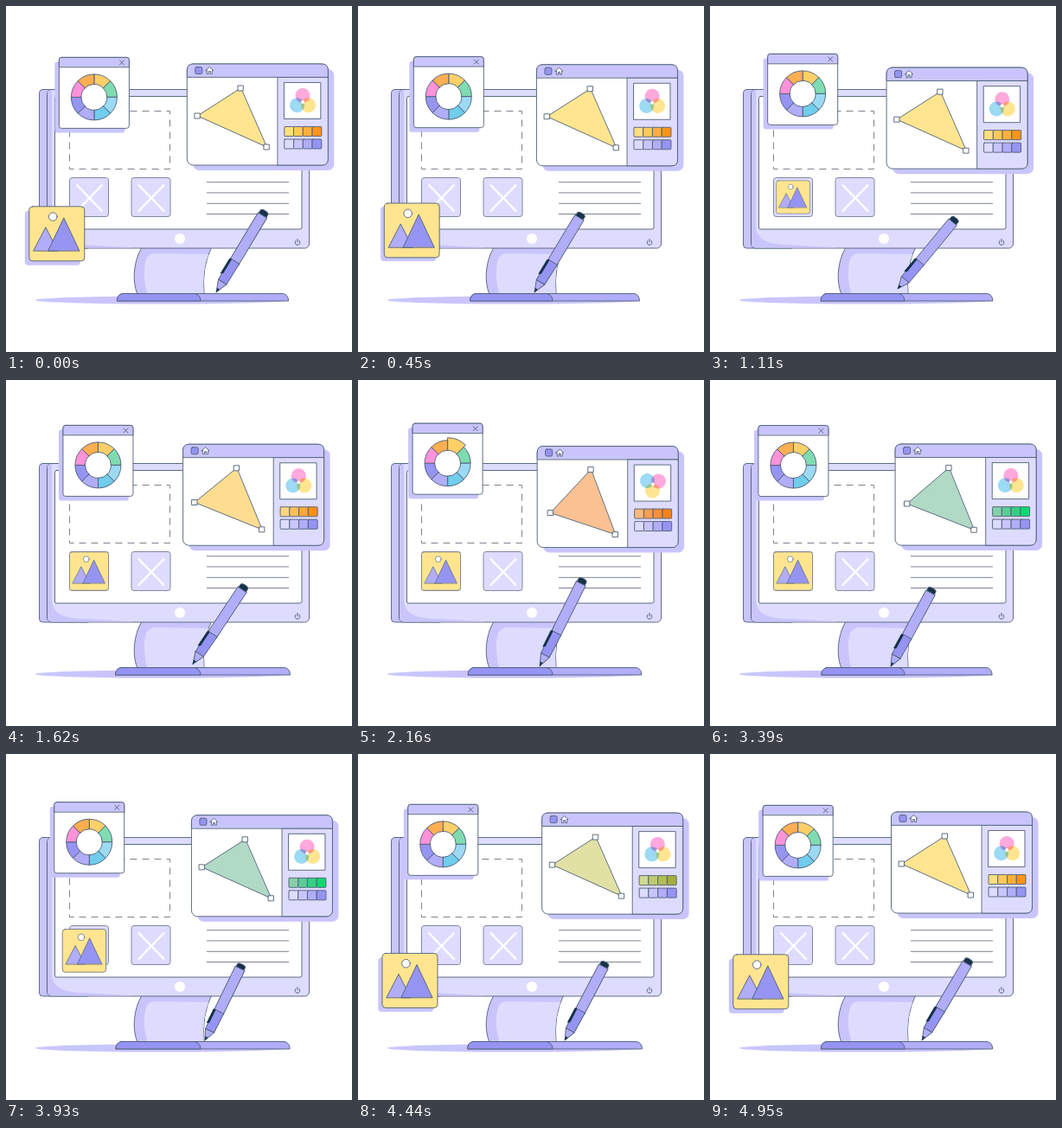
These frames come from a looping animation (400x400 px, 4.98 s). An HTML page:

```html
<!DOCTYPE html>
<html lang="en">
<head>
<meta charset="utf-8">
<title>Design desk</title>
<style>
html, body { margin: 0; width: 100%; height: 100%; overflow: hidden; background: #fff; }
svg { display: block; width: 100vw; height: 100vh; }
.o { stroke: #4e5f78; stroke-width: .9; stroke-linejoin: round; stroke-linecap: round; }
.n { fill: none; }
.light { fill: #dedcfe; }
.mid { fill: #c9c5fc; }
.lav { fill: #b1adf8; }
.deep { fill: #9694f3; }
.white { fill: #fff; }
.dark { fill: #16324a; }
.gray { fill: none; stroke: #7d8590; stroke-width: 1; }
#venn .ink { mix-blend-mode: multiply; }
</style>
</head>
<body>
<svg viewBox="0 0 400 400">
  <defs>
    <g id="slot">
      <rect class="light" stroke="#8187a0" width="45" height="45" rx="3"/>
      <path d="M8 8 38 39M38 8 8 39" fill="none" stroke="#fff" stroke-width="2.4"/>
    </g>
  </defs>

  <!-- stand -->
  <ellipse class="mid" cx="180" cy="340" rx="146" ry="4.6"/>
  <path class="mid o" d="M158 278C149 290 144.500 316 152 333H229Q226 302 238 278Z"/>
  <path class="light" d="M163 332Q157 308 162 293Q164 286 174 286L234 287Q227 304 228.500 332Z"/>
  <g id="base">
    <path class="lav o" d="M-93.500 332.500H93.500Q99.500 334 99.500 341H-99.500Q-99.500 334 -93.500 332.500Z"/>
    <path class="deep o" d="M-93.500 332.500H-9.500Q-2.500 334 -2.500 341H-99.500Q-99.500 334 -93.500 332.500Z"/>
  </g>

  <!-- monitor -->
  <rect class="mid o" x="38.500" y="96.500" width="60" height="183.500" rx="4"/>
  <rect class="light o" x="47.500" y="96.500" width="303" height="183.500" rx="5"/>
  <path class="mid" d="M48 101Q48 97 53 97V256Q54 275 88 276L150 279.500H53Q48 279 48 275Z"/>
  <rect class="white o" x="56.500" y="104.500" width="285.500" height="153.500" rx="2"/>
  <circle class="white" cx="201" cy="269" r="6"/>
  <path class="o n" d="M335.300 271a2.900 2.900 0 1 0 3.400 0M337 269.500V273"/>

  <!-- page -->
  <rect class="gray" x="73.500" y="121.500" width="116" height="67" stroke-dasharray="8 6"/>
  <use href="#slot" x="73.500" y="198.500"/>
  <use href="#slot" x="145" y="198.500"/>
  <path class="gray" d="M232 203.700H327M232 215.900H327M232 228.300H327M232 240.500H327"/>

  <!-- colour wheel window -->
  <g id="wheelWin">
    <rect class="mid" x="-5" y="5" width="81" height="82" rx="3"/>
    <rect class="white o" width="81" height="82" rx="3"/>
    <path class="mid o" d="M0 11V3Q0 0 3 0H78Q81 0 81 3V11Z"/>
    <path class="o n" d="M70 3.500 75 8.500M75 3.500 70 8.500"/>
    <g id="wheel" transform="translate(40.500 46)"></g>
  </g>

  <!-- drawing window -->
  <g id="drawWin">
    <rect class="mid" x="7" y="6" width="163" height="117" rx="7"/>
    <rect class="white o" width="163" height="117" rx="7"/>
    <path class="light o" d="M105 15H163V110Q163 117 156 117H105Z"/>
    <path class="mid o" d="M0 15V7Q0 0 7 0H156Q163 0 163 7V15Z"/>
    <rect class="deep o" x="9.500" y="3.500" width="8" height="8" rx="1.500"/>
    <path class="white o" d="M21.500 7.500 26 3.500 30.500 7.500H29V11.500H27V8.500H25V11.500H23V7.500Z"/>
    <rect class="white o" x="112.500" y="21.500" width="42" height="42"/>
    <g id="venn" style="isolation:isolate">
      <circle class="ink" cy="-7.500" r="8.500" fill="#ffa9dd"/>
      <circle class="ink" cx="-6.500" cy="3.750" r="8.500" fill="#9cdaf5"/>
      <circle class="ink" cx="6.500" cy="3.750" r="8.500" fill="#ffe58f"/>
      <circle class="white" r="2"/>
    </g>
    <g id="swatches"></g>
    <path id="tri" class="o"/>
    <g id="handles"></g>
  </g>

  <!-- picture tile -->
  <g id="tile">
    <rect id="tileShade" class="mid" width="64" height="63" rx="4"/>
    <rect class="o" fill="#ffe58f" width="64" height="63" rx="4"/>
    <circle class="white o" cx="27.500" cy="11.800" r="4.800"/>
    <path class="lav o" d="M5 51 19 24 33 51Z"/>
    <path class="deep o" d="M22 51 40 13 58 51Z"/>
  </g>

  <!-- pen, tip at the origin, pointing down -->
  <g id="pen">
    <path class="lav o" d="M-6 -40V-104H6V-40Z"/>
    <path class="dark o" d="M-5 -104V-108Q-4.500 -110 0 -110Q4.500 -110 5 -108V-104Z"/>
    <path class="deep o" d="M-5.500 -14 -6 -42H6L5.500 -14Z"/>
    <path class="lav o" d="M-5.500 -14 0 0 5.500 -14Z"/>
    <path class="dark" d="M-1.600 -5 0 0.500 1.600 -5Z"/>
    <path class="dark" d="M-7.200 -21V-41Q-5 -44 -4.200 -41V-23Z"/>
  </g>
</svg>
<script>
const LOOP = 4980, STEP = 30;
const $ = id => document.getElementById(id);
const mix = (a, b, p) => a + (b - a) * p;
const ramp = (t, a, b) => Math.min(1, Math.max(0, (t - a) / (b - a)));
const smooth = u => u * u * (3 - 2 * u);
const cubic = u => u < .5 ? 4 * u ** 3 : 1 - 4 * (1 - u) ** 3;
const move = (el, x, y, more = '') => el.setAttribute('transform', `translate(${x} ${y}) ${more}`);

function add(parent, tag, attrs) {
  const el = document.createElementNS('http://www.w3.org/2000/svg', tag);
  for (const k in attrs) el.setAttribute(k, attrs[k]);
  parent.append(el);
  return el;
}

const slices = ['#ffd068', '#7fdcb0', '#9cdaf4', '#70cdec', '#b1adf8', '#9694f3', '#ff92d9', '#ffae52']
  .map((fill, i) => add($('wheel'), 'path', { class: 'o', fill, transform: `rotate(${i * 45})` }));

function slicePath(r) {
  const c = Math.SQRT1_2, q = 15;
  return `M0 ${-q}V${-r}A${r} ${r} 0 0 1 ${r * c} ${-r * c}L${q * c} ${-q * c}A${q} ${q} 0 0 0 0 ${-q}Z`;
}
slices.forEach(s => s.setAttribute('d', slicePath(26.5)));

const swatchRow = y => [0, 1, 2, 3].map(i =>
  add($('swatches'), 'rect', { x: 112.5 + i * 10.75, y, width: 10.75, height: 11, rx: .8, class: 'o' }));
const inks = swatchRow(72.5);
swatchRow(87).forEach((s, i) => s.setAttribute('fill', ['#dedcfe', '#c9c5fc', '#b1adf8', '#9694f3'][i]));
const handles = [0, 1, 2].map(() => add($('handles'), 'rect', { width: 6, height: 6, class: 'white o' }));

// triangle fill followed by four swatches
const yellow = [0xffe58f, 0xffdf80, 0xffc95a, 0xffb03a, 0xff9418];
const orange = [0xfcc192, 0xfdb87c, 0xfa9d50, 0xf89038, 0xf58218];
const green = [0xb0dac5, 0x85d0a8, 0x5ccb98, 0x36cf84, 0x10d870];
const blend = (a, b, p) =>
  `rgb(${[16, 8, 0].map(s => Math.round(mix(a >> s & 255, b >> s & 255, p)))})`;

function paint(t) {
  let from = yellow, to = orange, p = smooth(ramp(t, 1450, 2000));
  if (t > 2350) [from, to, p] = [orange, green, smooth(ramp(t, 2350, 2750))];
  if (t > 4150) [from, to, p] = [green, yellow, smooth(ramp(t, 4150, 4650))];
  [$('tri'), ...inks].forEach((el, i) => el.setAttribute('fill', blend(from[i], to[i], p)));
}

// time, tip x, tip y, tilt, length
const penKeys = [
  [0, 243, 331, 31, 1], [450, 204, 331, 31, .97], [1110, 217, 327, 39.5, .965],
  [2160, 210, 331, 26.5, 1.03], [2880, 193, 331, 30.5, .99], [3930, 230, 331, 26, .89], [4950, 245, 331, 30.5, .99]
];
const n = penKeys.length;
const penKey = i => penKeys[(i + n) % n].map((v, k) => k ? v : v + Math.floor(i / n) * LOOP);

function penPose(t) {
  let i = n - 1;
  while (penKeys[i][0] > t) i--;
  const [a, b, c, d] = [-1, 0, 1, 2].map(k => penKey(i + k));
  const h = c[0] - b[0], u = (t - b[0]) / h;
  return [1, 2, 3, 4].map(k => {
    const m = (c[k] - a[k]) / (c[0] - a[0]) * h, w = (d[k] - b[k]) / (d[0] - b[0]) * h;
    return mix(b[k], c[k], smooth(u)) + m * u * (1 - u) ** 2 - w * u * u * (1 - u);
  });
}

function draw(t) {
  const a = t / LOOP * 2 * Math.PI, sin = Math.sin(a), cos = Math.cos(a);
  move($('wheelWin'), 61.1 + 5.6 * Math.sin(a + .05), 54.6 + 4.8 * cos);
  move($('drawWin'), 209.3 - 5.3 * sin, 72 - 5 * cos);
  move($('base'), 227.5, 0, `scale(${1 - .016 * Math.cos(2 * a - 1.3)} 1)`);

  const pop = smooth(ramp(t, 1900, 2100)) - smooth(ramp(t, 2250, 2500));
  slices[0].setAttribute('d', slicePath(26.5 + 3 * pop));
  move($('venn'), 133.7, 44, `rotate(${360 * smooth(ramp(t, 1930, 2800))})`);

  const s = smooth(ramp(t, 1350, 1950)) - smooth(ramp(t, 3100, 3700));
  const pts = [[62, mix(28, 27, s)], [mix(12, 15.3, s), mix(60, 77, s)], [mix(92, 90.3, s), mix(96, 102, s)]];
  $('tri').setAttribute('d', `M${pts.join('L')}Z`);
  handles.forEach((h, i) => move(h, pts[i][0] - 3, pts[i][1] - 3));
  paint(t);

  // the tile shrinks a little too far as it lands, then fills its slot
  const p = cubic(ramp(t, 200, 1080)) - cubic(ramp(t, 3562, 4660));
  const k = mix(1, .705, p * p) - .1 * Math.sin(Math.PI * ramp(t, 920, 1300));
  move($('tile'), mix(58.8, 96, p) - 32 * k, mix(263.3, 221, p) - 31.5 * k, `scale(${k})`);
  move($('tileShade'), -5 * (1 - p) ** 2, 5 * (1 - p) ** 2);

  const [x, y, tilt, len] = penPose(t);
  move($('pen'), x, y, `rotate(${tilt}) scale(1 ${len})`);
}

const start = performance.now();
function frame() {
  draw(Math.floor((performance.now() - start) / STEP) * STEP % LOOP);
  requestAnimationFrame(frame);
}
frame();
</script>
</body>
</html>
```
